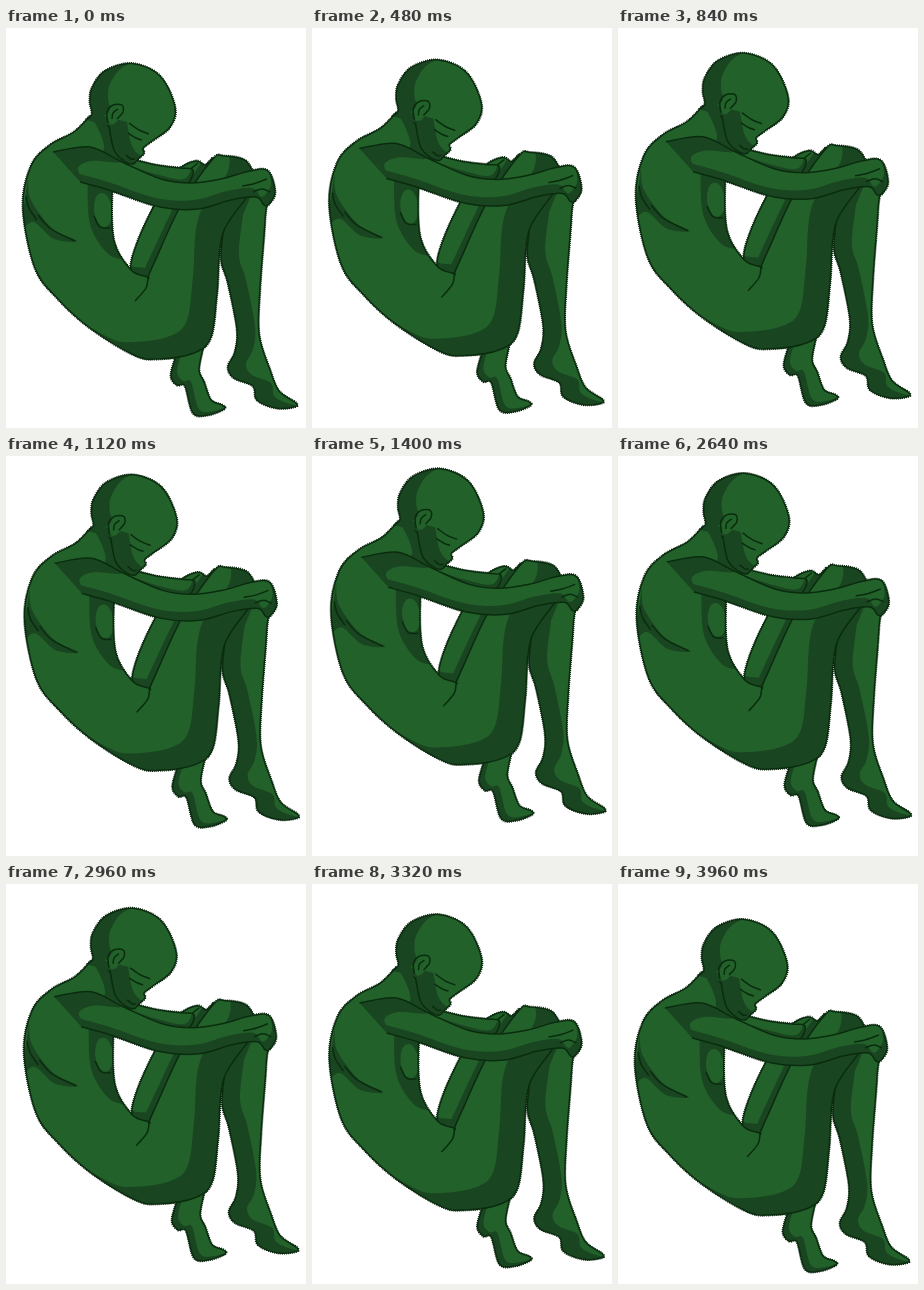
Recreate the animation shown at these times as an HTML page with a canvas. Size 300x400 px, loop 4 s.

```html
<!DOCTYPE html>
<html lang="en">
<head>
<meta charset="utf-8">
<title>Floating figure</title>
<style>
html, body { margin: 0; width: 100%; height: 100%; overflow: hidden; background: #fff; }
canvas { display: block; width: 300px; height: 400px; }
</style>
</head>
<body>
<canvas id="stage" width="300" height="400"></canvas>
<script>
const ctx = document.getElementById('stage').getContext('2d');
const LIGHT = '#22622a', DARK = '#1a4521', INK = '#0a2c0e', RIM = '#06180a';
const LOOP = 4000, STEP = 40, RISE = 29, SWAY = 2.8;

// Smooth open curve through "x,y x,y ..."; a doubled point makes a corner.
function curve(text) {
  const pts = text.trim().split(/\s+/).map(p => p.split(',').map(Number));
  const at = i => pts[Math.max(0, Math.min(pts.length - 1, i))];
  const path = new Path2D();
  path.moveTo(...pts[0]);
  for (let i = 0; i < pts.length - 1; i++) {
    const [a, b, c, d] = [at(i - 1), at(i), at(i + 1), at(i + 2)];
    path.bezierCurveTo(
      b[0] + (c[0] - a[0]) / 6, b[1] + (c[1] - a[1]) / 6,
      c[0] - (d[0] - b[0]) / 6, c[1] - (d[1] - b[1]) / 6, ...c);
  }
  return path;
}

function oval(x, y, rx, ry, turn) {
  const path = new Path2D();
  path.ellipse(x, y, rx, ry, turn, 0, Math.PI * 2);
  return path;
}

// Light falls on the outline moved by (dx, dy); the rest stays in shade.
function part(dx, dy, outline, { shade, glow, lines = [] } = {}) {
  return { dx, dy, outline: curve(outline), shade: shade && curve(shade), glow, lines: lines.map(curve) };
}

const farFoot = part(6, -4,
  `172,322 165,347 171,357 179,358 187,385 202,387 218,381 216,377 205,372
   198,354 193,342 197,320`);

const farLeg = part(-3, -9,
  `142,249 125,243 133,210 158,160 173,141 190,133 199,137 206,132 175,180 142,249`,
  { lines: ['172,153 181,144 192,135'] });

const farArm = part(-2, -5,
  '122,130 150,137 174,140 187,142 180,156 155,152 118,140');

const shin = part(18, -3,
  `228,168 258,170 259,192 254,260 253,306 264,342 273,363 290,375 288,379 270,380
   251,372 247,358 228,350 222,339 229,324 231,301 222,255 215,230 219,190`);

const trunk = part(-24, -17,
  `84,88 68,104 44,117 25,138 17,180 29,240 52,271 84,300 128,327 152,331 188,325
   205,309 211,265 217,205 246,160 241,134 218,128 206,132 175,177 149,233 142,249
   142,249 125,242 108,213 106,165 110,150 122,137 113,112 100,96`,
  {
    shade: '22,150 25,172 46,200 71,213 48,211 27,194 14,206',
    glow: oval(97, 182, 9, 17, -0.1),
    lines: ['32,187 45,201 69,213', '20,168 23,180 31,192',
      '88,188 94,199 104,200', '142,249 140,260 129,273']
  });

const head = part(18, -4,
  `80,92 86,86 84,74 86,60 99,43 126,35.5 154,48 169,79 164,99 146,113 137,120
   138,125 132,131 127,136 118,133 108,122 103,98`,
  {
    glow: oval(108, 87, 6, 10, 0.4),
    lines: ['102,95 101,84 107,77 116,77 117,84 111,91', '106,91 107,85 112,81',
      '123,95 133,102 143,106', '122,105 130,110 136,112', '120,127 125,131 129,131']
  });

const arm = part(-4, -9,
  `74,154 106,163 154,179 192,181 225,172 250,169 258,177 263,176 269,164 262,143
   244,143 215,151 185,155 155,151 116,134 84,119 47,124`,
  {
    shade: '49,124 82,119 114,134 86,133 72,140 78,153',
    lines: ['236,158 247,156 261,151', '247,164 256,161 264,164']
  });

const parts = [farFoot, farLeg, farArm, shin, trunk, head, arm];

function paint({ outline, dx, dy, shade, glow, lines }) {
  ctx.save();
  ctx.clip(outline);
  ctx.fillStyle = DARK;
  ctx.fill(outline);
  ctx.translate(dx, dy);
  ctx.fillStyle = LIGHT;
  ctx.fill(outline);
  ctx.translate(-dx, -dy);
  if (glow) ctx.fill(glow);
  ctx.fillStyle = DARK;
  if (shade) ctx.fill(shade);
  ctx.restore();
  ctx.strokeStyle = INK;
  ctx.lineWidth = 1.5;
  [outline, ...lines].forEach(l => ctx.stroke(l));
}

// Height of the float, 0 to 1: a cosine that lingers low and falls a little early.
function lift(t) {
  const u = t / (LOOP / 2);
  const phase = u < 1 ? u ** 1.04 : 1 + (u - 1) ** 0.76;
  return (1 - Math.cos(Math.PI * phase)) / 2;
}

function draw(t) {
  const h = lift(t);
  ctx.setTransform(1, 0, 0, 1, 0, 0);
  ctx.fillStyle = '#fff';
  ctx.fillRect(0, 0, 300, 400);
  ctx.translate(SWAY * h, -RISE * h);
  ctx.lineJoin = 'round';

  // Dotted rim; the fills cover its inner half.
  ctx.strokeStyle = RIM;
  ctx.lineWidth = 2.8;
  ctx.setLineDash([1, 1]);
  parts.forEach(p => ctx.stroke(p.outline));
  ctx.setLineDash([]);
  parts.forEach(paint);
}

const start = performance.now();
function tick() {
  const t = (performance.now() - start) % LOOP;
  draw(Math.floor(t / STEP) * STEP);
  requestAnimationFrame(tick);
}
tick();
</script>
</body>
</html>
```
